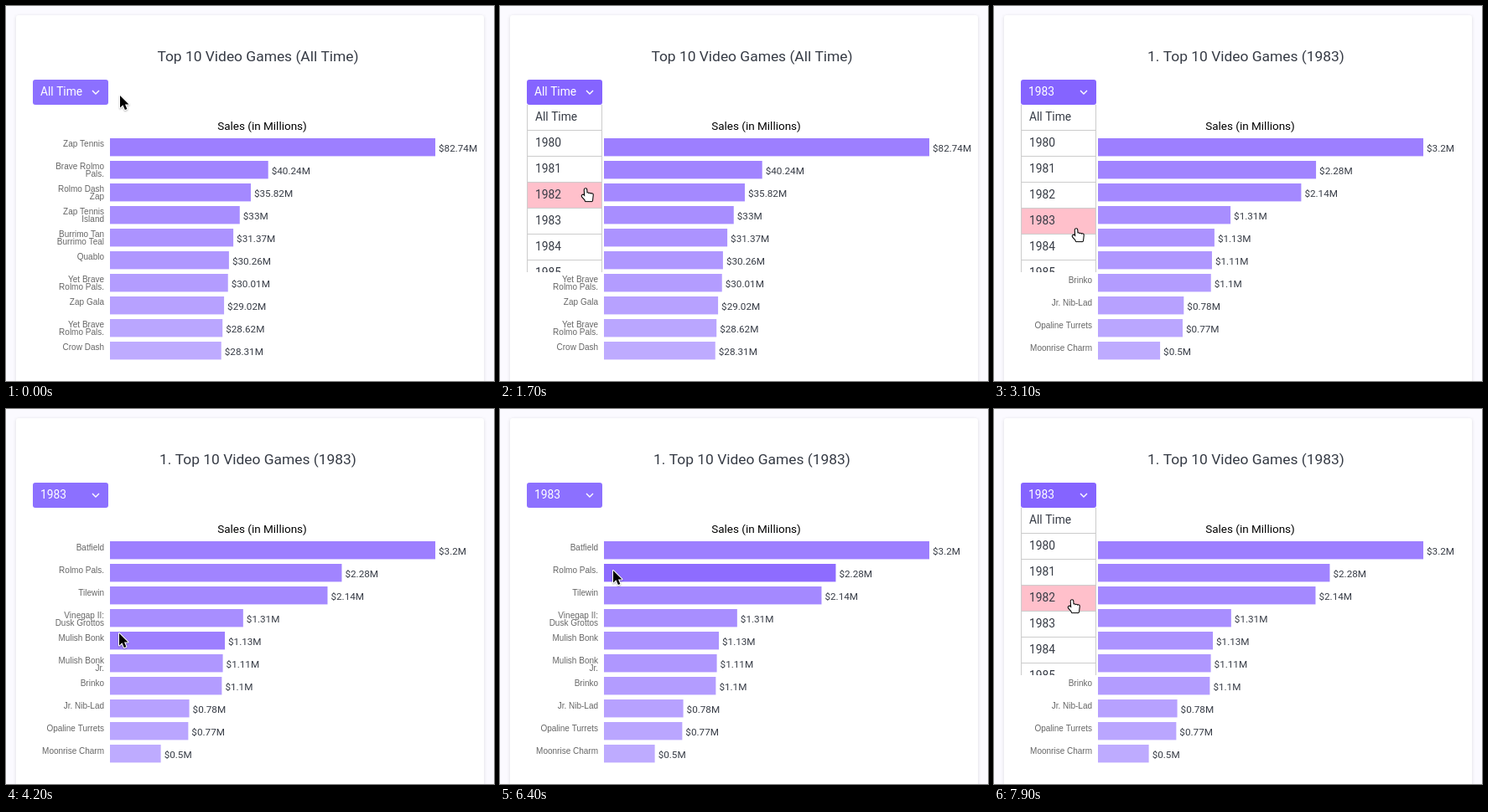
Recreate the animation shown at these times as an HTML page with a canvas. Size 582 by 448 pixels, loop 8000 ms.

```html
<!DOCTYPE html>
<html lang="en">
<head>
<meta charset="utf-8">
<title>Top 10 Video Games</title>
<style>
html, body { margin: 0; width: 100%; height: 100%; overflow: hidden; background: #fbfaff; }
canvas { display: block; }
</style>
</head>
<body>
<canvas id="stage" width="582" height="448"></canvas>
<script>
const ctx = document.getElementById('stage').getContext('2d');
const LOOP = 8000, STEP = 100;
const SANS = 'Roboto, sans-serif', LABEL = '"Liberation Sans", Arial, sans-serif';
const INK = '#363b45';
const BAR = { x: 124, y: 158, pitch: 27, height: 21.4, max: 388 };
const MENU = { x: 32, y: 118, width: 90, height: 200, row: 31 };
const SELECT = 2400, GROW_START = 2460, GROW_TIME = 1000, HOVER_TIME = 150;
const OPTIONS = ['All Time', ...Array.from({ length: 6 }, (_, i) => String(1980 + i))];

const allTime = {
  title: 'Top 10 Video Games (All Time)', choice: 'All Time', labelY: 10,
  names: ['Zap Tennis', 'Brave Rolmo|Pals.', 'Rolmo Dash|Zap', 'Zap Tennis|Island',
    'Burrimo Tan|Burrimo Teal', 'Quablo', 'Yet Brave|Rolmo Pals.', 'Zap Gala',
    'Yet Brave|Rolmo Pals.', 'Crow Dash'],
  values: [82.74, 40.24, 35.82, 33, 31.37, 30.26, 30.01, 29.02, 28.62, 28.31]
};
const year1983 = {
  title: '1. Top 10 Video Games (1983)', choice: '1983', labelY: 11,
  names: ['Batfield', 'Rolmo Pals.', 'Tilewin', 'Vinegap II:|Dusk Grottos', 'Mulish Bonk',
    'Mulish Bonk|Jr.', 'Brinko', 'Jr. Nib-Lad', 'Opaline Turrets', 'Moonrise Charm'],
  values: [3.2, 2.28, 2.14, 1.31, 1.13, 1.11, 1.1, 0.78, 0.77, 0.5]
};

// Each pointer move eases out to its goal
const HOME = { x: 136, y: 107 };
const MOVES = [
  { from: 0, to: 300, x: 111, y: 101 },
  { from: 1400, to: 2000, x: 98, y: 266 },
  { from: 3200, to: 3900, x: 134, y: 265 },
  { from: 4100, to: 4400, x: 135, y: 270 },
  { from: 4800, to: 4900, x: 135, y: 282 },
  { from: 5700, to: 6000, x: 135, y: 311 },
  { from: 6000, to: 6300, x: 135, y: 193 },
  { from: 6400, to: 6900, x: 109, y: 103 },
  { from: 7700, to: 7900, x: 93, y: 228 }
];

const clamp = v => Math.max(0, Math.min(1, v));
const mix = (a, b, k) => a + (b - a) * k;
const cubicInOut = k => k < 0.5 ? 4 * k ** 3 : 1 - 4 * (1 - k) ** 3;
const sineOut = k => Math.sin(k * Math.PI / 2);
const menuOpen = t => t >= 800 && t < 3500 || t >= 7000;

function pointerAt(t) {
  return MOVES.reduce((at, { from, to, x, y }) => {
    const k = sineOut(clamp((t - from) / (to - from)));
    return { x: mix(at.x, x, k), y: mix(at.y, y, k) };
  }, HOME);
}

function barLength(set, i) {
  return BAR.max * set.values[i] / set.values[0];
}

function barWidth(i, t) {
  const k = cubicInOut(clamp((t - GROW_START) / GROW_TIME));
  return mix(barLength(allTime, i), barLength(year1983, i), k);
}

function isOverBar(i, t) {
  const { x, y } = pointerAt(t);
  const top = BAR.y + BAR.pitch * i;
  return x >= BAR.x && x < BAR.x + barWidth(i, t) && y >= top && y < top + BAR.height;
}

// Share of the last moments the pointer spent on the bar
function hoverAmount(i, t) {
  const samples = 10;
  let hits = 0;
  for (let n = 0; n < samples; n++) hits += isOverBar(i, t - HOVER_TIME * n / samples);
  return hits / samples;
}

function text(str, x, y, size, color, align = 'left', family = SANS) {
  ctx.font = `${size}px ${family}`;
  ctx.fillStyle = color;
  ctx.textAlign = align;
  ctx.fillText(str, x, y);
}

function rect(x, y, w, h, color) {
  ctx.fillStyle = color;
  ctx.fillRect(x, y, w, h);
}

function roundRect(x, y, w, h, r, color) {
  ctx.beginPath();
  ctx.roundRect(x, y, w, h, r);
  ctx.fillStyle = color;
  ctx.fill();
}

function drawCard() {
  rect(0, 0, 582, 448, '#fbfaff');
  ctx.save();
  ctx.shadowColor = 'rgba(0,0,0,.13)';
  ctx.shadowBlur = 4;
  ctx.shadowOffsetY = 1;
  roundRect(12, 11, 558, 480, 3, '#fff');
  ctx.restore();
}

function drawChart(data, t) {
  text(data.title, 300.5, 66, 17.4, INK, 'center');
  text('Sales (in Millions)', 305.5, 148, 13.5, '#000', 'center');
  data.values.forEach((value, i) => {
    const y = BAR.y + BAR.pitch * i;
    const width = barWidth(i, t);
    const alpha = mix(0.8 - 0.03 * i, 0.92, hoverAmount(i, t));
    rect(BAR.x, y, width, BAR.height, `rgba(133,96,255,${alpha})`);
    text(`$${value}M`, BAR.x + width + 4, y + 16, 11.7, INK);
    data.names[i].split('|').forEach((line, n) =>
      text(line, 117, y + data.labelY + 9 * n, 10, '#666', 'right', LABEL));
  });
}

function drawButton(label, open) {
  roundRect(MENU.x, 88, MENU.width, 30, 3, open ? '#8564ff' : '#8c70ff');
  text(label, 41, 107, 13.8, '#fff');
  ctx.beginPath();
  ctx.moveTo(103, 101);
  ctx.lineTo(107, 105);
  ctx.lineTo(111, 101);
  ctx.strokeStyle = '#fff';
  ctx.lineWidth = 1.4;
  ctx.stroke();
}

function drawMenu(pointer) {
  const { x, y, width, height, row } = MENU;
  ctx.save();
  ctx.beginPath();
  ctx.rect(x, y, width, height);
  ctx.clip();
  rect(x, y, width, height, '#fff');
  OPTIONS.forEach((option, i) => {
    const top = y + row * i;
    if (pointer.y >= top && pointer.y < top + row) rect(x, top, width, row, '#ffc0cb');
    rect(x, top + row - 1, width, 1, '#ccc');
    text(option, x + 10, top + 19, 13.8, INK);
  });
  rect(x, y, 1, height, '#ccc');
  rect(x + width - 1, y, 1, height, '#ccc');
  ctx.restore();
}

function drawHand() {
  ctx.lineCap = 'round';
  for (const [color, width] of [['#000', 4.6], ['#fff', 2.5]]) {
    ctx.beginPath();
    for (let i = 0; i < 4; i++) {
      ctx.moveTo(2.5 * i, i ? 6 + i / 2 : 1.5);
      ctx.lineTo(mix(2.5 * i, 4, 0.2), 14);
    }
    ctx.moveTo(-3, 9);
    ctx.lineTo(1, 13.5);
    ctx.strokeStyle = color;
    ctx.lineWidth = width;
    ctx.stroke();
  }
}

const arrow = new Path2D('M0 0V14.5L3.4 11.3L5.9 17L8.4 16L6 10.4H10.5Z');

function drawArrow() {
  ctx.shadowColor = 'rgba(0,0,0,.3)';
  ctx.shadowBlur = 2;
  ctx.shadowOffsetY = 1;
  ctx.strokeStyle = '#fff';
  ctx.lineWidth = 2;
  ctx.stroke(arrow);
  ctx.shadowColor = 'transparent';
  ctx.fillStyle = '#000';
  ctx.fill(arrow);
}

function drawPointer({ x, y }, open) {
  const overControl = x >= MENU.x && x < MENU.x + MENU.width &&
    y >= 88 && y < MENU.y + (open ? MENU.height : 0);
  ctx.save();
  ctx.translate(Math.round(x), Math.round(y));
  ctx.lineJoin = 'round';
  if (overControl) drawHand();
  else drawArrow();
  ctx.restore();
}

function draw(t) {
  const data = t < SELECT ? allTime : year1983;
  const open = menuOpen(t);
  const pointer = pointerAt(t);
  drawCard();
  drawChart(data, t);
  if (open) drawMenu(pointer);
  drawButton(data.choice, open);
  drawPointer(pointer, open);
}

const start = performance.now();
function tick() {
  const t = (performance.now() - start) % LOOP;
  draw(Math.floor(t / STEP) * STEP);
  requestAnimationFrame(tick);
}
tick();
</script>
</body>
</html>
```
